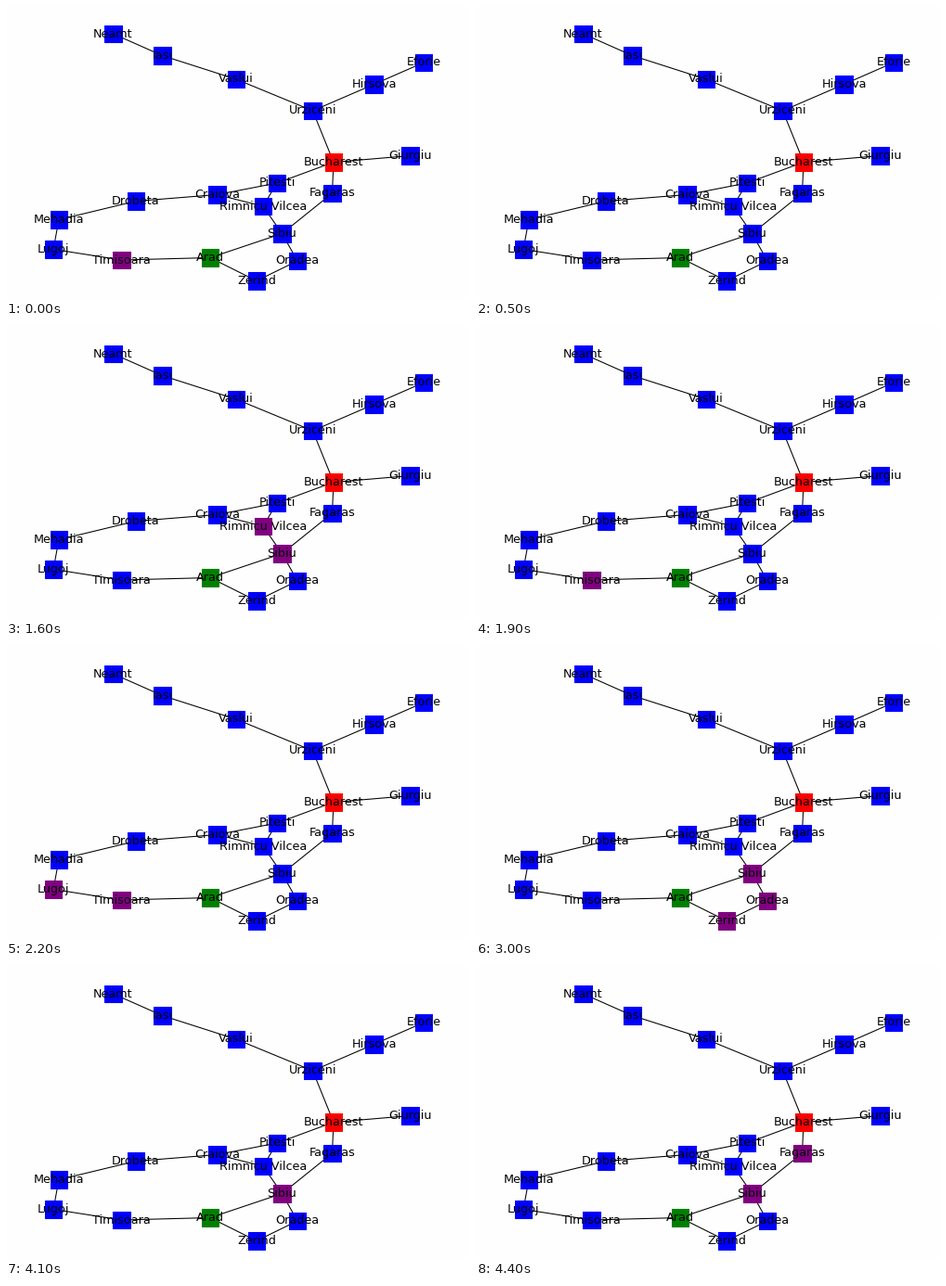
A matplotlib script for the animation above (5.1 s loop, 500 px wide and 315 px high).

```python
import matplotlib.pyplot as plt
from matplotlib.animation import FuncAnimation

W, H, DPI = 500, 315, 100
STEP, LOOP = 100, 5100
PX = 72 / DPI  # points per pixel

CITIES = {
    "Neamt": (115.5, 30), "Iasi": (168.5, 53.5), "Vaslui": (248, 79),
    "Urziceni": (330.5, 113), "Hirsova": (396.5, 84.5), "Eforie": (450, 61),
    "Bucharest": (353, 168.5), "Giurgiu": (435.5, 161.5),
    "Fagaras": (351.5, 202), "Pitesti": (292, 191), "Craiova": (227.5, 203.5),
    "Rimnicu Vilcea": (277, 216), "Drobeta": (140, 210.5),
    "Mehadia": (57, 230.5), "Lugoj": (51, 262.5), "Timisoara": (124.5, 274),
    "Arad": (220, 271.5), "Sibiu": (297.5, 245.5), "Oradea": (314, 275),
    "Zerind": (270, 296.5),
}

ROADS = [
    ("Neamt", "Iasi", "Vaslui", "Urziceni", "Hirsova", "Eforie"),
    ("Urziceni", "Bucharest", "Giurgiu"),
    ("Bucharest", "Pitesti", "Craiova", "Drobeta", "Mehadia", "Lugoj",
     "Timisoara", "Arad", "Sibiu", "Fagaras", "Bucharest"),
    ("Pitesti", "Rimnicu Vilcea", "Craiova"),
    ("Rimnicu Vilcea", "Sibiu", "Oradea", "Zerind", "Arad"),
]

# Start time in ms, then the colour of each city on the current search path
SEARCH = [
    (0, {"Timisoara": "purple"}),
    (200, {"Zerind": "purple"}),
    (500, {}),
    (800, {"Sibiu": "purple"}),
    (1000, {"Sibiu": "purple", "Oradea": "purple"}),
    (1300, {"Sibiu": "purple", "Fagaras": "purple"}),
    (1600, {"Sibiu": "purple", "Rimnicu Vilcea": "purple"}),
    (1900, {"Timisoara": "purple"}),
    (2200, {"Timisoara": "purple", "Lugoj": "purple"}),
    (2400, {"Sibiu": "purple"}),
    (2700, {"Sibiu": "purple", "Oradea": "purple"}),
    (3000, {"Sibiu": "purple", "Oradea": "purple", "Zerind": "purple"}),
    (3300, {"Sibiu": "purple", "Oradea": "purple"}),
    (3500, {"Sibiu": "orange", "Oradea": "orange"}),
    (3800, {"Sibiu": "orange"}),
    (4100, {"Sibiu": "purple"}),
    (4400, {"Sibiu": "purple", "Fagaras": "purple"}),
]

ENDS = {"Arad": "green", "Bucharest": "red"}

fig = plt.figure(figsize=(W / DPI, H / DPI), dpi=DPI, facecolor="#fefefe")
ax = fig.add_axes([0, 0, 1, 1])
ax.set(xlim=(0, W), ylim=(H, 0))
ax.axis("off")

for road in ROADS:
    for a, b in zip(road, road[1:]):
        ax.plot(*zip(CITIES[a], CITIES[b]), color="black", lw=1.06 * PX,
                zorder=1)

nodes = ax.scatter(*zip(*CITIES.values()), s=(18.3 * PX) ** 2, marker="s",
                   linewidths=1.06 * PX, zorder=2)

for name, (x, y) in CITIES.items():
    ax.text(x, y, name, family="DejaVu Sans", size=12.7 * PX,
            ha="center", va="center", zorder=3)


def draw(i):
    t = i * STEP
    path = [p for start, p in SEARCH if start <= t][-1]
    colors = {**path, **ENDS}
    nodes.set_color([colors.get(name, "blue") for name in CITIES])
    return [nodes]


anim = FuncAnimation(fig, draw, frames=LOOP // STEP, interval=STEP,
                     repeat=True, repeat_delay=0)
plt.show()
```
